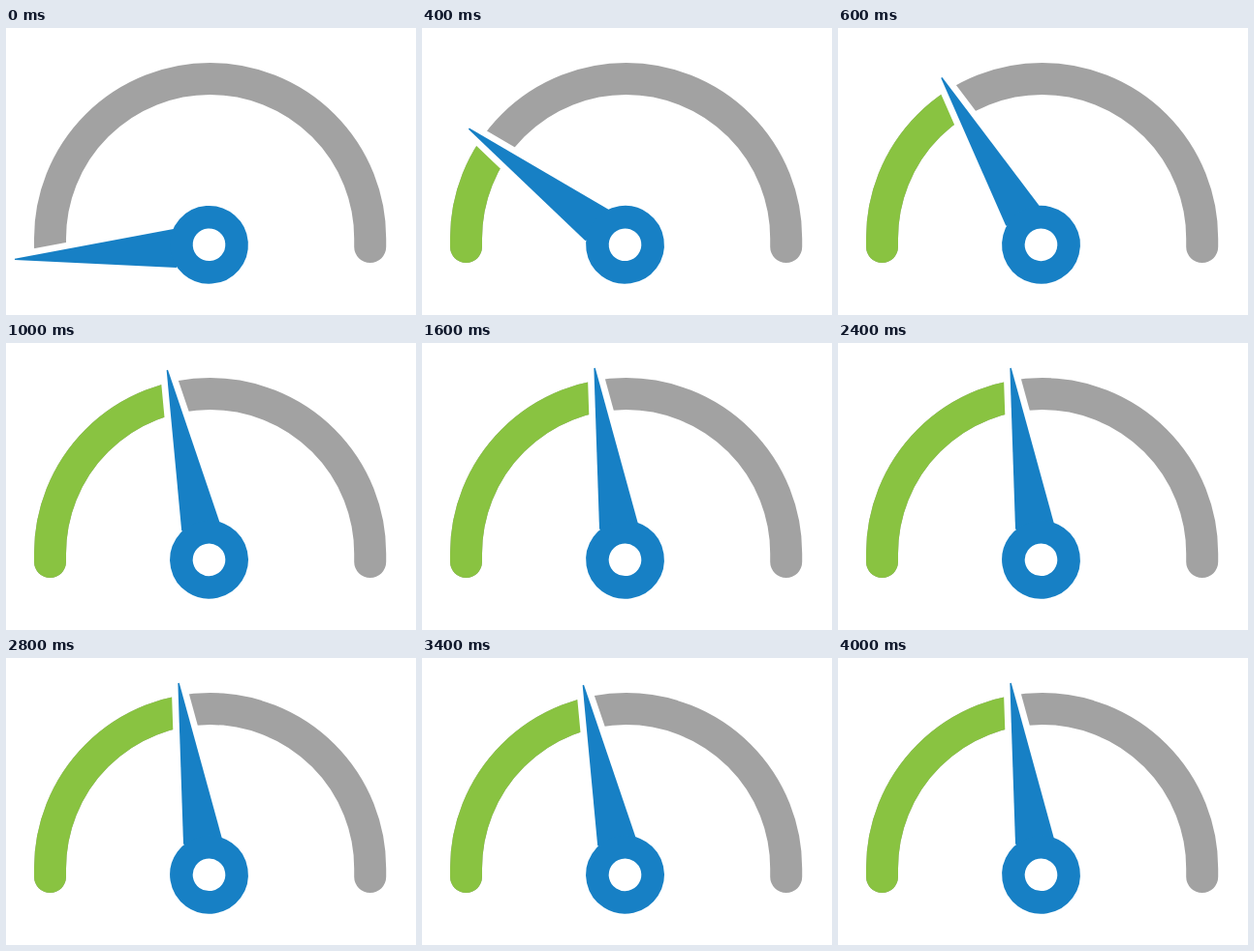
Animation of 423 by 297 pixels, one loop 4200 ms. Source, as an HTML page:

```html
<!DOCTYPE html>
<html lang="en">
<head>
<meta charset="utf-8">
<title>Gauge</title>
<style>
  html, body { margin: 0; width: 100%; height: 100%; overflow: hidden; background: #fff; }
  svg { display: block; width: 423px; height: 297px; }
  .arc { fill: none; stroke-width: 33; stroke-linecap: round; }
</style>
</head>
<body>
<svg viewBox="0 0 423 297">
  <defs>
    <path id="arc" d="M45.5 226.5V217.7A165.1 165.1 0 0 1 375.7 217.7V226.5"/>
    <path id="blade" d="M201 -.7V.7L35.5 19L20 0L35.5 -21.2Z"/>
    <clipPath id="passed">
      <rect class="turn" x="-60" y="-300" width="360" height="300"/>
    </clipPath>
  </defs>
  <use href="#arc" class="arc" stroke="#a2a2a2"/>
  <g clip-path="url(#passed)"><use href="#arc" class="arc" stroke="#89c341"/></g>
  <g class="turn">
    <use href="#blade" fill="#fff" stroke="#fff" stroke-width="13.4"/>
    <use href="#blade" fill="#1780c5"/>
    <circle r="28.6" fill="none" stroke="#1780c5" stroke-width="23.6"/>
  </g>
</svg>
<script>
  const STEP = 200, LOOP = 4200;
  const sweep = [-4.3, 20.3, 36.7, 59.3];
  const turning = document.querySelectorAll('.turn');

  // Sweeps up in steps, then trembles between two positions.
  function angleAt(time) {
    const i = Math.floor(time % LOOP / STEP);
    return sweep[i] ?? (i % 2 ? 77.6 : 81);
  }

  let start;
  function draw(now) {
    start ??= now;
    const pose = `translate(209.5 224.3) rotate(${180 + angleAt(now - start)})`;
    turning.forEach(el => el.setAttribute('transform', pose));
    requestAnimationFrame(draw);
  }
  requestAnimationFrame(draw);
</script>
</body>
</html>
```
